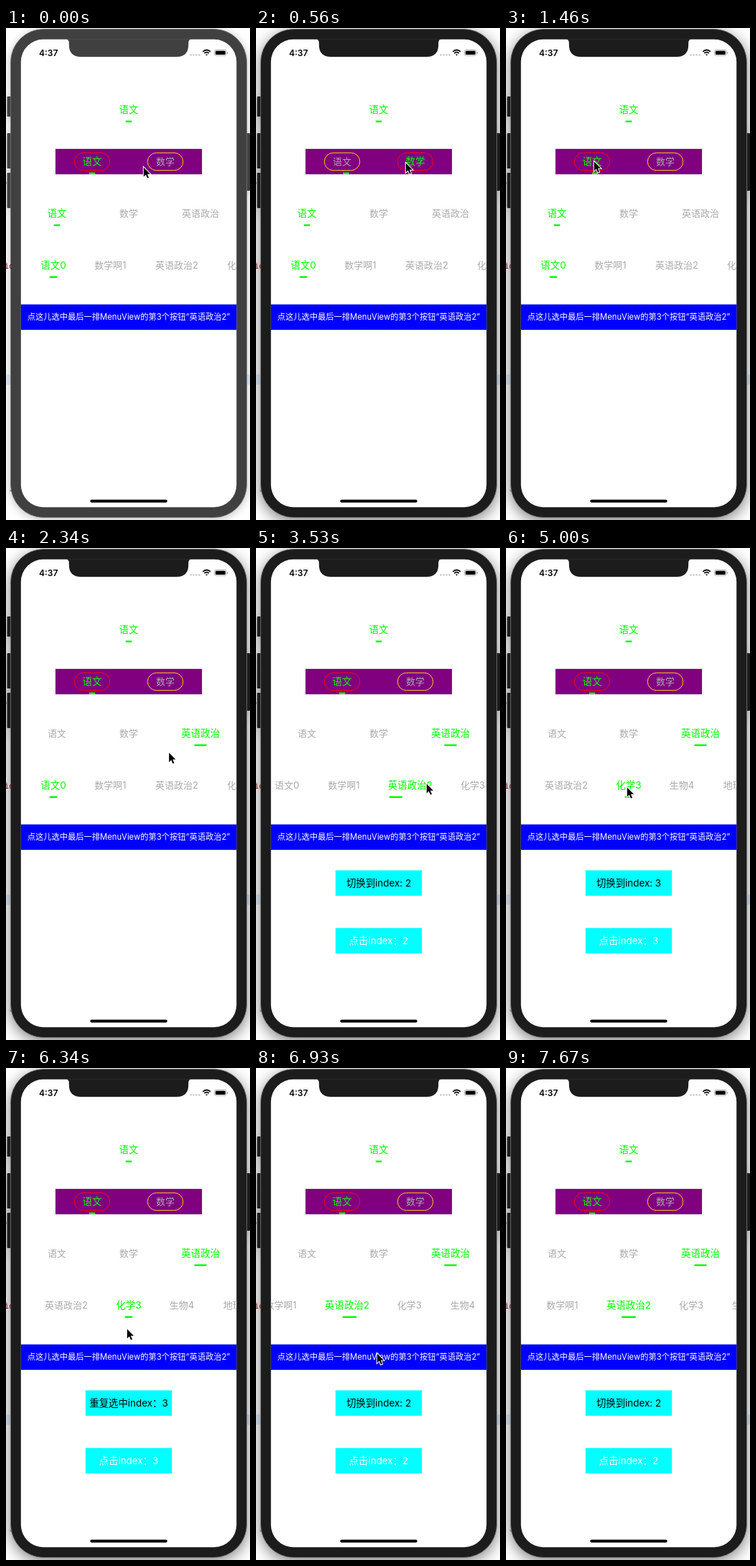
Animation, 340 px wide and 683 px high, one loop 7.82 s. Source, as an HTML page:

```html
<!DOCTYPE html>
<html lang="zh-CN">
<head>
<meta charset="utf-8">
<style>
html, body { margin: 0; width: 100%; height: 100%; overflow: hidden; background: #fff; }
svg { display: block; font-family: Inter, "Noto Sans CJK SC", "Noto Sans CJK", sans-serif; }
#phone { fill: #404040; filter: drop-shadow(0 2px 6px rgba(0,0,0,.25)); }
#phone.active { fill: #1c1c1c; filter: drop-shadow(0 5px 10px rgba(0,0,0,.5)); }
</style>
</head>
<body>
<svg width="340" height="683" viewBox="0 0 340 683">
  <defs><clipPath id="screen"><rect x="20.800" y="15.800" width="300.400" height="649.400"/></clipPath></defs>
  <rect y="481" width="340" height="14" fill="#e3eefb"/>
  <g id="phone">
    <rect x="1.5" y="95" width="8" height="28" rx="1"/>
    <rect x="1.5" y="146" width="8" height="49" rx="1"/>
    <rect x="1.5" y="201" width="8" height="49" rx="1"/>
    <rect x="332" y="146" width="8" height="80" rx="1"/>
    <rect x="6.5" y="1.5" width="329" height="678" rx="46" stroke="#777" stroke-width=".8"/>
  </g>
  <g font-size="10" font-family="Noto Sans Mono, monospace">
    <text x="-2" y="334" fill="#611">ic</text>
    <text x="-3" y="222" fill="#22c">'</text>
    <text x="4" y="649" fill="#555">"</text>
  </g>
  <rect x="20.800" y="15.800" width="300.400" height="649.400" rx="31" fill="#fff"/>
  <path id="notch" d="M82.500 15.300q5.300 0 5.300 5.500v2.500q0 16.700 16.500 16.700h133.400q16.500 0 16.500-16.700v-2.500q0-5.500 5.300-5.500z"/>
  <text x="46" y="38.500" font-size="12" font-weight="600">4:37</text>
  <g fill="#c8c8c8">
    <circle cx="257.500" cy="37.500" r="1.300"/><circle cx="261.500" cy="37.500" r="1.300"/>
    <circle cx="265.500" cy="37.500" r="1.300"/><circle cx="269.500" cy="37.500" r="1.300"/>
  </g>
  <g fill="none" stroke="#000" stroke-width="1.700">
    <path d="M274.300 32.800q5.300-4.600 10.600 0M276.300 35q3.300-2.700 6.600 0"/>
    <path d="M278 36.500h3.200l-1.600 2z" fill="#000" stroke="none"/>
  </g>
  <rect x="290.500" y="30.500" width="16.500" height="7.800" rx="2.200" fill="none" stroke="#999" stroke-width=".8"/>
  <rect x="291.800" y="31.800" width="13.900" height="5.200" rx="1.200"/>
  <path d="M308 33v3q1.200-.4 1.200-1.500t-1.200-1.500" fill="#999"/>
  <rect x="68.900" y="167.800" width="204.200" height="35.300" fill="#800080"/>
  <rect x="20.800" y="383.700" width="300.400" height="35.300" fill="#00f"/>
  <rect x="117.300" y="654.700" width="107.400" height="4" rx="2"/>
  <g id="live"></g>
</svg>
<script>
const LOOP = 7820, STEP = 148.1;
const phone = document.getElementById('phone');
const notch = document.getElementById('notch');
const live = document.getElementById('live');

// Each row: label centres, indicator widths, and taps as [time, index].
const rows = [
  { y: 113, labels: ['语文'], xs: [171], bars: [9], taps: [] },
  { y: 185, labels: ['语文', '数学'], xs: [120, 222], bars: [9, 9], taps: [[533, 1], [1280, 0]], pills: true },
  { y: 257, labels: ['语文', '数学', '英语政治'], xs: [71, 171, 271], bars: [9, 9, 17.5], taps: [[1880, 2]] },
  { y: 329, labels: ['语文0', '数学啊1', '英语政治2', '化学3', '生物4', '地理5'],
    xs: [66, 145.5, 238, 325, 399, 473.5], bars: [11, 14, 20, 11, 11, 11],
    taps: [[2890, 1], [3388, 2], [4200, 3], [6760, 2]], scrolls: true }
];

// Pointer positions as [time, x, y].
const path = [
  [0, 191, 192], [265, 191, 192], [412, 208, 186], [870, 208, 186], [1155, 122, 184],
  [1450, 122, 184], [1890, 265, 257], [2040, 265, 257], [2340, 226, 283], [2640, 142, 332],
  [2930, 142, 332], [3226, 237, 326], [3530, 237, 326], [4560, 237, 330], [5003, 168, 331],
  [6188, 168, 331], [6336, 168, 361], [6632, 168, 395], [6930, 168, 395], [7373, 272, 612], [7521, 294, 664]
];

const mix = (a, b, u) => a + (b - a) * u;
const unit = u => Math.max(0, Math.min(1, u));
const ease = u => (u = unit(u), u * u * (3 - 2 * u));

const text = (s, x, y, size, fill, more = '') =>
  `<text x="${x}" y="${y + size * .37}" font-size="${size}" fill="${fill}" text-anchor="middle" ${more}>${s}</text>`;

function choice(taps, t) {
  let from = 0, to = 0, at = -1e4;
  for (const [time, index] of taps) if (t >= time) [from, to, at] = [to, index, time];
  return { from, to, age: t - at };
}

function drawRow({ y, labels, xs, bars, taps, pills, scrolls }, t) {
  const { from, to, age } = choice(taps, t);
  const offset = i => scrolls ? Math.max(0, xs[i] - 171) : 0;
  const shift = mix(offset(from), offset(to), ease(age / 340));
  const u = ease(age / 192);
  const w = mix(bars[from], bars[to], u);
  const mid = mix(xs[from], xs[to], u) - shift;
  const items = labels.map((s, i) => {
    const on = i === to, x = xs[i] - shift;
    const pill = pills ? `<rect x="${x - 24.7}" y="173.300" width="49.400" height="24.400" rx="12.200"
      fill="none" stroke="${on ? '#f00' : '#fc1'}"/>` : '';
    return pill + text(s, x, y, on ? 13.5 : 13, on ? '#0f0' : '#aaa');
  }).join('');
  const top = y + 15.6;
  return items + `<rect x="${mid - w / 2}" y="${top}" width="${w}" height="2.400" rx="1.200" fill="#0f0"/>`;
}

const toast = (s, y, fill, alpha) =>
  `<g opacity="${alpha}"><rect x="110.800" y="${y}" width="120.400" height="35.300" fill="#0ff"/>${text(s, 171, y + 18, 13.4, fill)}</g>`;

function drawToasts(t) {
  const { to } = choice(rows[3].taps, t);
  if (!to) return '';
  const again = t >= 5540 && t < 6760;
  const blink = t >= 4600 ? unit((t - 4600) / 400) : 1;
  const top = again ? unit((t - 5540) / 200) : blink;
  return toast(again ? `重复选中index：${to}` : `切换到index: ${to}`, 447.5, '#000', top) +
    toast(`点击index：${to}`, 527.5, '#fff', blink);
}

function drawPointer(t) {
  if (t > 7600) return '';
  const i = Math.max(1, path.findIndex(p => p[0] >= t));
  const b = path[i], a = path[i - 1], u = unit((t - a[0]) / (b[0] - a[0]));
  return `<path transform="translate(${mix(a[1], b[1], u)} ${mix(a[2], b[2], u)})"
    d="M.8 1.500v13l3-2.900 2.200 5 2-.9-2.100-4.900h4.100z"
    stroke="#fff" stroke-width="2" paint-order="stroke"/>`;
}

function frame(now) {
  const clock = now % LOOP;
  const t = Math.max(0, 560 + Math.floor((clock - 554) / STEP) * STEP);
  const active = clock >= 150;
  phone.classList.toggle('active', active);
  notch.setAttribute('fill', active ? '#1c1c1c' : '#404040');
  const pressed = t > 6600 && t < 6760;
  live.innerHTML = `<g clip-path="url(#screen)">${rows.map(r => drawRow(r, t)).join('')}</g>` +
    text('点这儿选中最后一排MenuView的第3个按钮“英语政治2”', 171, 401, 11.28, '#fff', pressed ? 'opacity=".3"' : '') +
    drawToasts(t) + drawPointer(t);
  requestAnimationFrame(frame);
}
requestAnimationFrame(frame);
</script>
</body>
</html>
```
